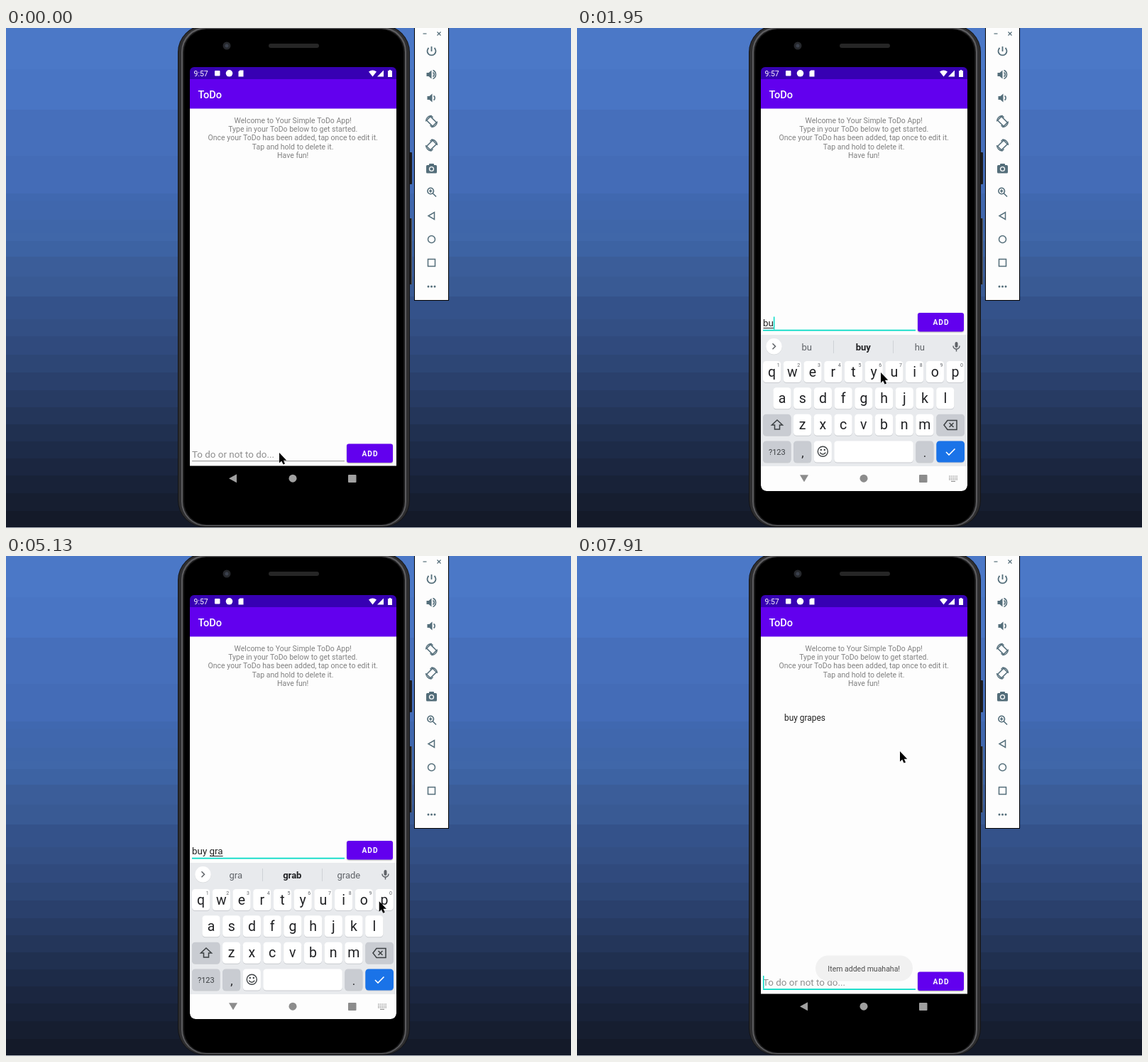
These frames come from a looping animation (796 px wide and 704 px high, 8 s). An HTML page with a canvas:

```html
<!DOCTYPE html>
<html lang="en">
<head>
<meta charset="utf-8">
<title>ToDo app demo</title>
<style>
html, body { margin: 0; width: 100%; height: 100%; overflow: hidden; background: #10141f; }
canvas { display: block; }
</style>
</head>
<body>
<canvas id="stage" width="796" height="704"></canvas>
<script>
const g = document.getElementById('stage').getContext('2d');
const LOOP = 8000;
const TEXT = '#222';

const ticks = [0];
for (const [from, to, n] of [[130, 1120, 8], [1260, 2240, 8], [2370, 3390, 9], [3530, 4500, 8],
  [4620, 5550, 8], [5670, 5940, 3], [6210, 7210, 9], [7330, 7330, 1], [7610, 7910, 3]])
  for (let i = 0; i < n; i++) ticks.push(n > 1 ? from + (to - from) * i / (n - 1) : from);

// Pointer path: time, x, y
const pointer = [
  [130, 385, 598], [412, 408, 591], [690, 441, 575], [840, 441, 575], [1120, 432, 564], [1400, 432, 562],
  [1680, 447, 492], [1820, 447, 492], [1955, 428, 485], [2110, 428, 485], [2240, 424, 487], [2370, 424, 487],
  [2880, 425, 600], [3010, 425, 600], [3390, 407, 523], [3530, 407, 523], [3800, 363, 489], [3945, 363, 489],
  [4220, 296, 520], [4370, 296, 520], [4500, 305, 512], [5010, 505, 490], [5145, 525, 486], [5280, 540, 489],
  [5420, 540, 489], [5550, 448, 491], [5790, 331, 497], [6210, 331, 497], [6560, 322, 522], [6710, 322, 522],
  [7210, 511, 418], [7330, 510, 419], [7610, 510, 419], [7910, 455, 275]
];

// Key presses: character, down, up
const presses = [['b', 1250, 1390], ['u', 1670, 1810], ['y', 2200, 2360], [' ', 2870, 3000], ['g', 3380, 3520],
  ['r', 3790, 3940], ['a', 4215, 4355], ['p', 5275, 5410], ['e', 5795, 5930], ['s', 6575, 6700]];

const suggestions = {
  'b': 'b,but,be', 'bu': 'bu,*buy,hu', 'buy': 'buy,but,bring', 'buy ': 'a,the,it',
  'buy g': 'g,going,good', 'buy gr': 'gr,great,group', 'buy gra': 'gra,*grab,grade',
  'buy grap': 'grap,graphics,trap', 'buy grape': 'grap,graphics,trap', 'buy grapes': 'grapes,grape,graphs'
};

function box(x, y, w, h, fill, r = 0) {
  g.fillStyle = fill;
  g.beginPath();
  g.roundRect(x, y, w, h, r);
  g.fill();
}
function disc(x, y, r, fill) {
  g.fillStyle = fill;
  g.beginPath();
  g.arc(x, y, r, 0, 7);
  g.fill();
}
function label(str, x, y, size, color, { align = 'center', weight = 400, gap = 0 } = {}) {
  g.font = `${weight} ${size}px Roboto, sans-serif`;
  g.letterSpacing = gap + 'px';
  g.textAlign = align;
  g.textBaseline = 'alphabetic';
  g.fillStyle = color;
  g.fillText(str, x, y + size * 0.355);
  return g.measureText(str).width;
}
function icon(d, x, y, color, width = 0, turn = 0) {
  g.save();
  g.translate(x, y);
  g.rotate(turn);
  const path = new Path2D(d);
  g.fillStyle = g.strokeStyle = color;
  g.lineWidth = width;
  width ? g.stroke(path) : g.fill(path);
  g.restore();
}
function shadow(color, blur, dy) {
  g.shadowColor = color;
  g.shadowBlur = blur;
  g.shadowOffsetY = dy;
}

function drawBackdrop() {
  const bands = [[0, '#4b78c7'], [58, '#4975c4'], [115, '#466fbb'], [180, '#446cb7'], [233, '#4068b0'], [243, '#4067ad'],
    [270, '#3f66a9'], [288, '#4067a9'], [300, '#3d63a3'], [322, '#3b5d99'], [350, '#395a94'], [378, '#34528a'],
    [410, '#334f84'], [434, '#304a7d'], [460, '#2d4675'], [485, '#2a406c'], [510, '#273b63'], [534, '#24365a'],
    [558, '#203050'], [582, '#1d2b48'], [606, '#1b2640'], [630, '#182238'], [655, '#161e30'], [680, '#141a29']];
  for (const [y, color] of bands) box(0, y, 796, 704 - y, color);
  box(0, 703, 796, 1, '#b4b8c0');
}

function drawPhone() {
  box(568, 175, 4, 45, '#1b1b1d', 1);
  box(568, 268, 4, 93, '#1b1b1d', 1);
  box(571, 268, 1, 93, '#55585c');
  box(242, -4, 327, 707, '#141415', 38);
  box(243, -3, 325, 705, '#2e2e30', 37);
  box(247, -1, 317, 702, '#5c5c5f', 34);
  box(249, 1, 313, 699, '#1a1a1b', 33);
  box(251, 2, 309, 697, '#000', 32);
  disc(311, 25, 5.5, '#26282c');
  disc(311, 25, 2.5, '#3b414d');
  box(370, 22, 71, 6, '#262626', 3);
}

function drawToolbar() {
  const c = '#546e7a', x = 599.5;
  box(575, 0, 49, 384, '#000');
  box(576, 0, 47, 383, '#fdfdfd');
  icon('M-2.5 0H2.5', 590, 8, c, 1.2);
  icon('M-2.5-2.5L2.5 2.5M2.5-2.5L-2.5 2.5', 610, 8, c, 1.2);
  icon('M0-7V0M-4-5A6 6 0 1 0 4-5', x, 33, c, 1.8);
  const speaker = 'M-7-2.5H-4L0-6V6L-4 2.5H-7Z';
  icon(speaker, x, 65.5, c);
  icon('M2-3A3.5 3.5 0 0 1 2 3M2-6A6.5 6.5 0 0 1 2 6', x, 65.5, c, 1.6);
  icon(speaker, x + 1, 98.5, c);
  icon('M3-3A3.5 3.5 0 0 1 3 3', x, 98.5, c, 1.6);
  for (const [y, flip] of [[131.5, 1], [165, -1]]) {
    g.save();
    g.translate(x, y);
    g.scale(flip, 1);
    icon('M-3.8-6H3.8V6H-3.8Z', 0, 0, c, 1.5, -Math.PI / 4);
    icon('M-8 0A8 8 0 0 1-.5-8L2-5.5M8 0A8 8 0 0 1 .5 8L-2 5.5', 0, 0, c, 1.3);
    g.restore();
  }
  box(592, 193, 15, 11.5, c, 1.5);
  box(596, 191, 7, 4, c, 1);
  disc(x, 198.5, 3.6, '#fdfdfd');
  disc(x, 198.5, 2.3, c);
  icon('M3 -1.5A4.3 4.3 0 1 1 -5.6 -1.5A4.3 4.3 0 1 1 3 -1.5M2 2L6.5 6.5M-3.5-1.5H.9M-1.3-3.7V.7', x, 231, c, 1.6);
  icon('M4-5V5L-4.5 0Z', x, 264.5, c, 1.5);
  icon('M5 0A5 5 0 1 1-5 0A5 5 0 1 1 5 0', x, 297.5, c, 1.5);
  icon('M-5-5H5V5H-5Z', x, 330.5, c, 1.5);
  for (const dx of [-4.5, 0, 4.5]) disc(x + dx, 364, 1.5, c);
}

function drawApp(text, focused, off, caretOn, added) {
  box(259, 113, 291, 503.5, '#fdfdfd');
  box(259, 55, 291, 18, '#3700b3', [6, 6, 0, 0]);
  box(259, 72, 291, 41.6, '#6200ee');
  label('9:57', 264.5, 64, 10.5, '#fff', { align: 'left' });
  box(294, 60, 7.5, 7.5, '#fff', 1);
  disc(314.5, 63.8, 4.8, '#fff');
  icon('M-1.5-4.5H3.5V4.5H-3.5V-2.5Z', 331, 64, '#fff');
  icon('M0 4.5L-5.5-2.5Q0-6.5 5.5-2.5Z', 516.5, 64, '#fff');
  icon('M4-4.5V4.5H-5Z', 528, 64, '#fff');
  icon('M-1-5H1V-4H3V5H-3V-4H-1Z', 541, 64, '#fff');
  label('ToDo', 270.5, 94, 14.6, '#fff', { align: 'left', weight: 500 });
  ['Welcome to Your Simple ToDo App!', 'Type in your ToDo below to get started.',
    'Once your ToDo has been added, tap once to edit it.', 'Tap and hold to delete it.', 'Have fun!']
    .forEach((line, i) => label(line, 404.2, 129.8 + i * 12.4, 10.5, '#808080'));
  if (added) label('buy grapes', 292, 227.8, 11.9, TEXT, { align: 'left' });

  const y = 600 - off, opts = { align: 'left' };
  let end = 262.5;
  if (text) {
    end += label(text, 262, y, 13.4, TEXT, opts);
    const word = text.split(' ').pop();
    const w = g.measureText(word).width;
    if (word) box(end - w, y + 6.5, w - 0.5, 1, TEXT);
  } else label('To do or not to do...', 262, y, 13.4, '#8e8e8e', opts);
  focused ? box(262, y + 9.3, 215, 1.8, '#03dac5') : box(262, y + 9.3, 215, 1, '#8a8a8a');
  if (focused && caretOn) box(end - 0.5, y - 9, 1.5, 18, '#03dac5');

  shadow('rgba(0,0,0,.3)', 2, 1);
  box(480, 585.5 - off, 65, 26.5, '#6200ee', 3);
  shadow('transparent', 0, 0);
  label('ADD', 513, 599 - off, 10.2, '#fff', { weight: 700, gap: 0.9 });
}

function drawNav(color, up) {
  icon(up ? 'M-6-5H6L0 5Z' : 'M5-6V6L-6 0Z', 320, 634.3, color);
  disc(404, 634.2, 5.5, color);
  box(482, 629, 11.5, 11, color, 1);
}

const rows = [['qwertyuiop', 274.6, 469], ['asdfghjkl', 289, 506.3], ['zxcvbnm', 317.6, 543.8]];
const PITCH = 28.72;

function key(x, y, w, fill = '#fff') {
  box(x, y + 1, w, 30, '#c9ccd0', 4.5);
  box(x, y, w, 30, fill, 4.5);
}

function drawKeyboard(text, pressed) {
  const ink = '#202124', grey = '#5f6368', dark = '#c9ccd2';
  box(259, 432, 291, 186, '#e8eaed');
  box(259, 617, 291, 35, '#fdfdfd', [0, 0, 8, 8]);
  disc(277.5, 449, 11.3, '#d6d8db');
  disc(277.5, 448.3, 11.2, '#fff');
  icon(text ? 'M-2-4L2 0L-2 4' : 'M2-4L-2 0L2 4', 277.5, 448.3, grey, 1.5);
  box(532.5, 442, 4, 8, grey, 2);
  icon('M-4.5-1A4.5 4.5 0 0 0 4.5-1M0 3.5V7', 534.5, 448.5, grey, 1.5);
  if (text) {
    suggestions[text].split(',').forEach((word, i) => {
      const bold = word[0] === '*';
      label(word.replace('*', ''), [323.7, 403.3, 482.8][i], 449, 13, bold ? ink : grey, { weight: bold ? 700 : 400 });
    });
    for (const x of [361, 445]) box(x, 440, 1, 18, '#cfd2d6');
  } else {
    icon('M3-1.5A4 4 0 1 1-5-1.5A4 4 0 1 1 3-1.5M1.8 1.8L6 6', 316, 448.5, grey, 1.6);
    icon('M-5.5-5.5H5.5V1.5L1.5 5.5H-5.5ZM5 1.5H1.5V5M-3 1Q0 4 2-.5M-2.5-2.5V-1M2.5-2.5V-1', 357, 448.5, grey, 1.4);
    label('GIF', 398.5, 448.5, 10.5, grey, { weight: 700 });
    icon('M-5-5H5V6H-5ZM-2-6H2V-3H-2ZM-2.5 0H2.5M-2.5 3H1.5', 440.5, 448.5, grey, 1.4);
    box(466, 440, 1, 18, '#cfd2d6');
    for (const x of [488, 492.5, 497]) disc(x, 448.5, 1.5, grey);
  }

  let popup;
  rows.forEach(([letters, x0, y], row) => [...letters].forEach((ch, i) => {
    const x = x0 + i * PITCH;
    key(x - 12.6, y, 25.2);
    label(ch, x, y + 14.7, 19.5, ink);
    if (!row) label((i + 1) % 10, x + 9, y + 6, 7, grey);
    if (ch === pressed) popup = [ch, x, y];
  }));
  key(262, 543.8, 39.5, dark);
  icon('M0-7L7.5 0H3.5V6H-3.5V0H-7.5Z', 282, 559, '#3c4043', 1.5);
  key(506.3, 543.8, 39.7, dark);
  icon('M-9 0L-4-6.5H9V6.5H-4ZM-1.5-3L4.5 3M4.5-3L-1.5 3', 526, 559, '#3c4043', 1.5);
  key(262, 581.5, 39.5, dark);
  label('?123', 281.8, 597, 11, '#3c4043');
  key(305, 581.5, 25.2, dark);
  label(',', 318, 597.5, 17, ink);
  key(333.7, 581.5, 25.2);
  icon('M7 0A7 7 0 1 1-7 0A7 7 0 1 1 7 0M-4 1.5Q0 6.5 4 1.5', 346.3, 596.3, '#3c4043', 1.4);
  disc(343.8, 594, 1.2, '#3c4043');
  disc(348.8, 594, 1.2, '#3c4043');
  key(362.3, 581.5, 111.5, pressed === ' ' ? dark : '#fff');
  key(477.3, 581.5, 25.2, dark);
  label('.', 490, 597.5, 17, ink);
  key(506.3, 581.5, 39.7, '#1a73e8');
  icon('M-6 .5L-2 4.5L6.5-4', 526, 596.5, '#fff', 1.6);

  drawNav('#8c8c8c', true);
  for (let i = 0; i < 15; i++) box(524 + i % 5 * 2.6, 630.5 + (i / 5 | 0) * 2.4, 1.6, 1.3, '#999');
  box(527, 637.8, 6, 1.2, '#999');

  if (popup) {
    const [ch, x, y] = popup;
    shadow('rgba(0,0,0,.3)', 3, 1);
    box(x - 14, y - 52, 29, 82, '#c8cbd0', 4);
    shadow('transparent', 0, 0);
    label(ch, x, y - 31, 20, ink);
    label('...', x + 8, y - 18, 9, '#3c4043');
  }
}

function drawPointer(t) {
  let i = pointer.findIndex(p => p[0] > t);
  if (i < 0) i = pointer.length - 1;
  const b = pointer[i], a = pointer[i - 1] || [0, b[1], b[2]];
  const k = Math.min(1, (t - a[0]) / (b[0] - a[0]));
  const x = a[1] + (b[1] - a[1]) * k, y = a[2] + (b[2] - a[2]) * k;
  icon('M0 0V14.5L3.2 11.6L5.6 16.6L8 15.5L5.8 10.7H10.2Z', x, y, '#000');
}

function draw(time) {
  const t = ticks.findLast(s => s <= time + 25);
  const added = t >= 7600, focused = t >= 250;
  const typed = presses.filter(p => t >= p[2]);
  const text = added ? '' : typed.map(p => p[0]).join('');
  const held = presses.find(p => t >= p[1] && t < p[2]);
  const lastEdit = added ? 7600 : typed.length ? typed.at(-1)[2] : 250;
  const caretOn = (t - lastEdit) % 1000 < 500;
  const rise = added ? Math.max(0, 1 - (t - 7610) / 260) : Math.min(1, Math.max(0, (t - 270) / 400));
  const raised = added ? t < 7700 : t >= 400;

  drawBackdrop();
  drawPhone();
  drawToolbar();
  drawApp(text, focused, raised ? 184.5 : 0, caretOn, added);
  drawNav('#a0a0a0', false);
  if (rise > 0) {
    g.save();
    g.beginPath();
    g.roundRect(259, 55, 291, 597, 8);
    g.clip();
    g.translate(0, (1 - rise) ** 2 * 220);
    drawKeyboard(text, held && held[0]);
    g.restore();
  }
  if (t >= 7700) {
    g.globalAlpha = t > 7850 ? 0.95 : 0.5;
    box(336, 562.5, 137, 36, '#f1f1f1', 18);
    label('Item added muahaha!', 404.2, 580.8, 10.5, '#444');
    g.globalAlpha = 1;
  }
  drawPointer(t);
}

function loop() {
  draw(performance.now() % LOOP);
  requestAnimationFrame(loop);
}
loop();
</script>
</body>
</html>
```
